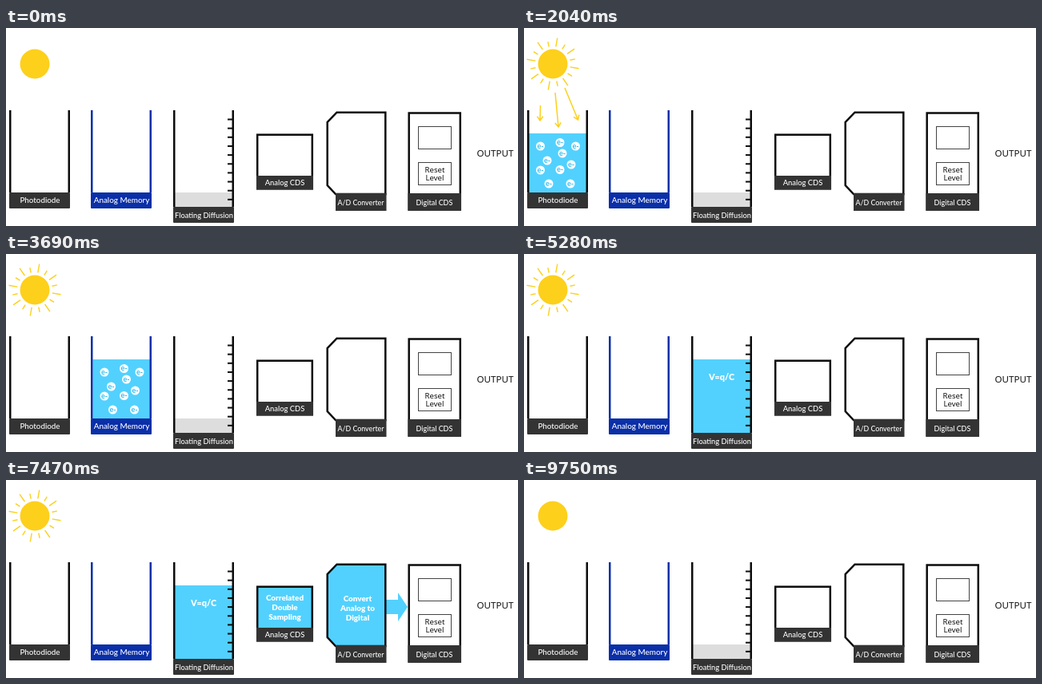
Recreate the animation shown at these times as an HTML page. Size 640 by 248 pixels, loop 9780 ms.

```html
<!DOCTYPE html>
<html lang="en">
<head>
<meta charset="utf-8">
<title>Image sensor signal path</title>
<style>
html, body { margin: 0; width: 100%; height: 100%; overflow: hidden; background: #fff; }
svg { display: block; width: 640px; height: 248px; }
text { font-family: Lato, "Open Sans", sans-serif; font-weight: 500; text-anchor: middle; fill: #fff; }
.bold { font-weight: 900; }
.dark { font-family: "Noto Sans", "Open Sans", sans-serif; fill: #111; }
.charge { fill: #36bdf0; font-weight: 700; }
</style>
</head>
<body>
<svg id="stage" viewBox="0 0 640 248"></svg>
<script>
const LOOP = 9780;
const BLUE = '#52d1fe', SUN = '#fdd01b', INK = '#0c0c0c', BASE = '#333', NAVY = '#0a2fa8';
const WALL = 2.5;
const stage = document.getElementById('stage');

function add(parent, tag, attrs = {}, content) {
  const node = document.createElementNS('http://www.w3.org/2000/svg', tag);
  for (const key in attrs) node.setAttribute(key, attrs[key]);
  if (content) node.textContent = content;
  parent.appendChild(node);
  return node;
}
const group = (parent = stage) => add(parent, 'g');
const rect = (parent, x, y, right, bottom, fill, more) =>
  add(parent, 'rect', { x, y, width: right - x, height: bottom - y, fill, ...more });
const label = (parent, str, x, y, size, cls = '') =>
  add(parent, 'text', { x, y, 'font-size': size, class: cls }, str);
const lines = (parent, words, x, y, step, size, cls) =>
  words.forEach((word, i) => label(parent, word, x, y + i * step, size, cls));

const clamp = v => Math.max(0, Math.min(1, v));
const ramp = (t, from, to) => clamp((t - from) / (to - from));
const easeOut = p => 1 - (1 - p) * (1 - p);
const fade = (node, v) => node.setAttribute('opacity', v.toFixed(3));

// Sun, rays and light arrows
const rays = add(stage, 'path', { stroke: SUN, 'stroke-width': 1.4, fill: 'none' });
add(stage, 'circle', { cx: 36, cy: 45, r: 18.5, fill: SUN });

function rayPath(grow) {
  let d = '';
  for (let k = 0; k < 16; k++) {
    const a = (10 + k * 22.5) * Math.PI / 180;
    const end = 18 + (k % 2 ? 10.5 : 15) * grow;
    const start = Math.min(22, end);
    const at = r => `${36 + r * Math.cos(a)} ${45 + r * Math.sin(a)}`;
    d += `M${at(start)}L${at(end)}`;
  }
  return d;
}

const beams = [[20.5, 97, 20, 116], [39, 81, 43, 124], [51, 75, 67.5, 115]];
function beamPath(grow) {
  if (!grow) return '';
  return beams.map(([x0, y0, x1, y1]) => {
    const x = x0 + (x1 - x0) * grow, y = y0 + (y1 - y0) * grow;
    const a = Math.atan2(y1 - y0, x1 - x0);
    const size = 6.5 * Math.min(1, grow * 3);
    const barb = s => `${x - size * Math.cos(a + s)} ${y - size * Math.sin(a + s)}`;
    return `M${x0} ${y0}L${x} ${y}M${barb(.6)}L${x} ${y}L${barb(-.6)}`;
  }).join('');
}

// Transfer arrows sit behind the vessels
const arrows = [
  { start: 2490, end: 3690, from: 80, tip: 106 },
  { start: 3960, end: 4860, from: 182, tip: 209 },
  { start: 5280, end: 6270, from: 285, tip: 313 },
  { start: 6420, end: 7380, from: 384, tip: 400.5 },
  { start: 7410, end: 8370, from: 475, tip: 502 }
];
const arrowShape = cy =>
  `M0 ${cy}L-12 ${cy - 18}V${cy - 9}H-30V${cy + 9}H-12V${cy + 18}Z`;
for (const a of arrows) a.node = add(stage, 'path', { d: arrowShape(159), fill: BLUE });
const outArrow = add(stage, 'path', { d: arrowShape(157.5), fill: BLUE });

const vessels = group();

function openVessel(x, right, bottom, wall, base) {
  rect(vessels, x, 103, right, bottom, '#fff');
  const liquid = group(vessels);
  rect(vessels, x, 103, x + WALL, bottom, wall);
  rect(vessels, right - WALL, 103, right, bottom, wall);
  rect(vessels, x, bottom, right, bottom + 20, base, { rx: 1 });
  return liquid;
}

const electrons = [[20.5, 148], [45, 143.5], [64.5, 148], [29, 166], [48, 157],
  [59, 171], [20.5, 178], [45, 177.5], [31, 195], [58, 195]];
function chargedLiquid(parent, x) {
  rect(parent, x + 2, 132, x + 74, 206, BLUE);
  for (const [ex, ey] of electrons) {
    const cx = x - 4 + ex;
    add(parent, 'circle', { cx, cy: ey, r: 5.5, fill: '#fff' });
    label(parent, 'e-', cx, ey + 2.5, 9, 'charge');
  }
}

// Photodiode
const clip = add(add(stage, 'clipPath', { id: 'level' }), 'rect', { x: 0, width: 90, y: 206, height: 0 });
const diode = openVessel(4, 80, 206, INK, BASE);
diode.setAttribute('clip-path', 'url(#level)');
chargedLiquid(diode, 4);
label(vessels, 'Photodiode', 42.5, 219, 9.8);

// Analog memory
const memory = openVessel(106, 182, 206, NAVY, NAVY);
chargedLiquid(memory, 106.5);
label(vessels, 'Analog Memory', 144.5, 219, 9.9);

// Floating diffusion
const well = openVessel(209, 285, 224, INK, BASE);
rect(well, 211, 206, 283, 224, '#ddd');
const diffusion = group(well);
rect(diffusion, 211, 132, 283, 224, BLUE);
label(diffusion, 'V=q/C', 247, 158, 10.8, 'bold');
for (let i = 0; i < 10; i++) {
  const y = 113.5 + i * 11.15;
  rect(vessels, 277, y, 284, y + 2, INK);
}
label(vessels, 'Floating Diffusion', 247.5, 237.5, 9.3);

// Analog CDS
const outline = { stroke: INK, 'stroke-width': WALL };
rect(vessels, 314, 133.5, 383, 201, '#fff');
const analog = group(vessels);
rect(analog, 314, 134, 383, 186, BLUE);
lines(analog, ['Correlated', 'Double', 'Sampling'], 348.5, 151, 12, 9.9, 'bold');
rect(vessels, 314.2, 133.7, 382.8, 201.2, 'none', outline);
rect(vessels, 313, 185, 384, 202.5, BASE);
label(vessels, 'Analog CDS', 348.5, 197, 9.4);

// A/D converter
const housing = 'M413.5 105.7H474.3V208H412L401.7 197V118Z';
add(vessels, 'path', { d: housing, fill: '#fff' });
const converter = group(vessels);
add(converter, 'path', { d: housing, fill: BLUE });
lines(converter, ['Convert', 'Analog to', 'Digital'], 439.5, 152, 12, 9.9, 'bold');
add(vessels, 'path', { d: housing, fill: 'none', ...outline });
rect(vessels, 412, 207, 475.5, 229, BASE);
label(vessels, 'A/D Converter', 443.5, 222, 8.8);

// Digital CDS
rect(vessels, 503.7, 106.5, 567.8, 227.5, '#fff', outline);
rect(vessels, 502.5, 207, 569, 229, BASE);
label(vessels, 'Digital CDS', 535.5, 222, 9);
const signal = group(vessels);
rect(signal, 515.5, 123.5, 556.5, 151.5, BLUE);
lines(signal, ['Signal', 'Level'], 536, 135.5, 10, 9.9, 'bold');
for (const y of [123.5, 168.5])
  rect(vessels, 515.5, y, 556.5, y + 28, 'none', { stroke: '#444', 'stroke-width': 1 });
lines(vessels, ['Reset', 'Level'], 536, 180.5, 10.3, 9.6, 'dark');

label(stage, 'OUTPUT', 611.5, 161, 11.6, 'dark');
const light = add(stage, 'path', { stroke: SUN, 'stroke-width': 1.5, fill: 'none' });

function draw(t) {
  const shine = easeOut(ramp(t, 60, 2040));
  const reset = ramp(t, 9000, 9750);
  const keep = 1 - reset;

  rays.setAttribute('d', rayPath(shine * (1 - reset ** 3)));
  fade(rays, t < 60 ? 0 : 1 - ramp(t, 9480, 9750));
  light.setAttribute('d', beamPath(shine));
  fade(light, 1 - ramp(t, 2490, 2850));

  const height = 74 * easeOut(ramp(t, 1050, 2040));
  clip.setAttribute('y', 206 - height);
  clip.setAttribute('height', height);

  fade(diode, 1 - ramp(t, 2600, 3450));
  fade(memory, ramp(t, 2700, 3600) * (1 - ramp(t, 4050, 4750)));
  fade(diffusion, ramp(t, 4100, 4860) * keep);
  fade(analog, ramp(t, 5450, 6240) * keep);
  fade(converter, ramp(t, 6600, 7350) * keep);
  fade(signal, ramp(t, 7600, 8340) * keep);

  for (const { node, start, end, from, tip } of arrows) {
    const x = from + (tip - from) * ramp(t, start, start + 60);
    node.setAttribute('transform', `translate(${x} 0)`);
    fade(node, t > start && t < end ? 1 - ramp(t, end - 450, end - 30) : 0);
  }

  const tip = 569 + 31 * ramp(t, 8490, 8820);
  outArrow.setAttribute('transform', `translate(${tip} 0)`);
  fade(outArrow, ramp(t, 8490, 8730) * (1 - ramp(t, 8850, 9300)));
}

const begin = performance.now();
function tick() {
  draw((performance.now() - begin) % LOOP);
  requestAnimationFrame(tick);
}
tick();
</script>
</body>
</html>
```
